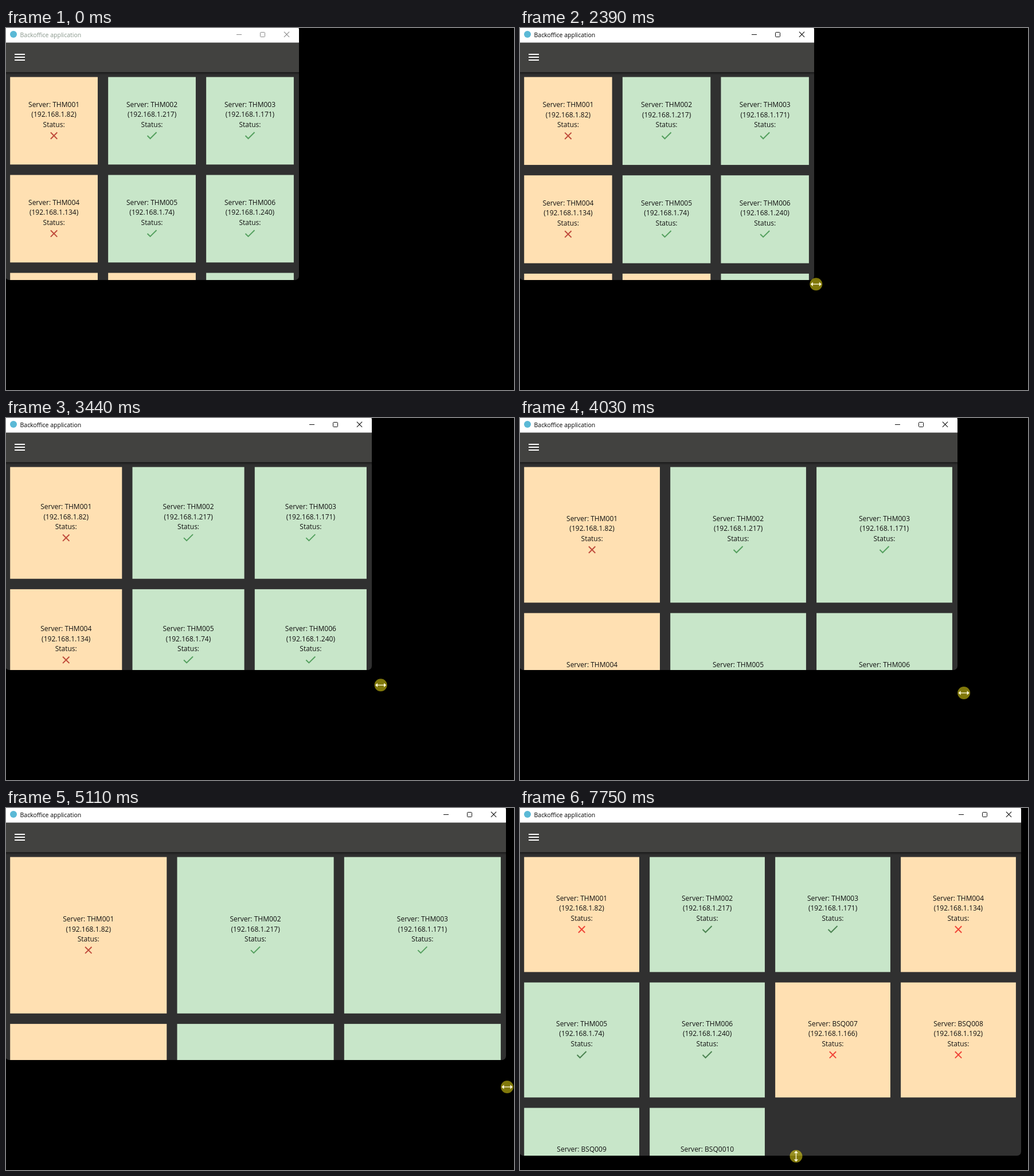
Write an HTML page with a canvas that moves like this. It is 886 px wide and 632 px high and loops after 8000 ms.

```html
<!DOCTYPE html>
<html lang="en">
<head>
<meta charset="utf-8">
<title>Backoffice application</title>
<style>
  html, body { margin: 0; width: 100%; height: 100%; overflow: hidden; background: #000; }
  canvas { display: block; }
</style>
</head>
<body>
<canvas id="stage" width="886" height="632"></canvas>
<script>
const ctx = document.getElementById('stage').getContext('2d');
const LOOP = 8000;
const RESIZE_LAG = 70;     // the window trails the pointer by one repaint
const TABLET_HEIGHT = 573; // taller windows get a fourth column

const hosts = [82, 217, 171, 134, 74, 240, 166, 192, 55, 61];
const offline = [1, 4, 7, 8];
const servers = hosts.map((host, i) => ({
  name: (i < 6 ? 'THM00' : 'BSQ00') + (i + 1),
  address: `(192.168.1.${host})`,
  online: !offline.includes(i + 1),
}));

// Pointer path: time, x, y
const path = [
  [260, 715, 610], [600, 570, 490], [900, 502, 433], [1050, 509, 437],
  [1510, 509, 437], [1560, 510.5, 446], [2260, 510.5, 446],
  [2810, 535, 451], [2880, 541.5, 451.5], [3030, 561, 455],
  [3900, 757, 479], [3960, 763, 479.5], [4030, 774, 480],
  [4710, 861, 486], [5110, 874, 487], [5310, 874, 487],
  [5450, 800, 478], [5700, 560, 447], [5940, 470, 435], [6270, 470, 435],
  [6330, 474.5, 442], [6810, 474.5, 441], [7150, 475.5, 499],
  [7220, 476, 536.5], [7550, 480, 598], [7680, 481.5, 608],
];

const clamp = v => Math.min(1, Math.max(0, v));

function pointerAt(t) {
  const next = path.findIndex(key => key[0] > t);
  if (next < 0) return path.at(-1).slice(1);
  if (next === 0) return path[0].slice(1);
  const [t0, x0, y0] = path[next - 1], [t1, x1, y1] = path[next];
  const k = (t - t0) / (t1 - t0);
  return [x0 + (x1 - x0) * k, y0 + (y1 - y0) * k];
}

function windowSize(t) {
  const [x, y] = pointerAt(t - RESIZE_LAG);
  const width = t < 2260 + RESIZE_LAG ? 511 : t < 5310 ? Math.max(511, x) : 874;
  const height = t < 6810 + RESIZE_LAG ? 440 : Math.max(440, y - 1);
  return [Math.round(width), Math.round(height)];
}

function rect(color, x, y, w, h) {
  ctx.fillStyle = color;
  ctx.fillRect(x, y, w, h);
}

function circle(color, x, y, r) {
  ctx.fillStyle = color;
  ctx.beginPath();
  ctx.arc(x, y, r, 0, 2 * Math.PI);
  ctx.fill();
}

function lines(color, width, ...strokes) {
  ctx.strokeStyle = color;
  ctx.lineWidth = width;
  ctx.beginPath();
  for (const [start, ...rest] of strokes) {
    ctx.moveTo(...start);
    rest.forEach(p => ctx.lineTo(...p));
  }
  ctx.stroke();
}

function polygon(color, points) {
  ctx.fillStyle = color;
  ctx.beginPath();
  points.forEach(p => ctx.lineTo(...p));
  ctx.fill();
}

function cross(color, width, x, y, r) {
  lines(color, width, [[x - r, y - r], [x + r, y + r]], [[x - r, y + r], [x + r, y - r]]);
}

function drawTitleBar(width, active) {
  rect('#fff', 0, 0, width, 25.5);
  circle('#5bb9d6', 13, 11, 6);
  ctx.font = '10.5px "Open Sans", "Noto Sans", sans-serif';
  ctx.textAlign = 'left';
  ctx.fillStyle = active ? '#000' : '#87968a';
  ctx.fillText('Backoffice application', 24.5, 15.5);
  const color = active ? '#111' : '#8a8a8a';
  lines(color, 1, [[width - 109, 11.5], [width - 100, 11.5]]);
  ctx.beginPath();
  ctx.roundRect(width - 67.5, 7.5, 8, 8, 1);
  ctx.stroke();
  cross(color, 1.1, width - 21.5, 11.3, 4.6);
}

function drawAppBar(width) {
  rect('#424240', 0, 25.5, width, 51.5);
  for (const y of [45, 50, 55]) rect('#fff', 15, y, 18, 2);
  const shadow = ctx.createLinearGradient(0, 77, 0, 82);
  shadow.addColorStop(0, 'rgba(0,0,0,.45)');
  shadow.addColorStop(1, 'rgba(0,0,0,0)');
  rect(shadow, 0, 77, width, 5);
}

function drawTile(server, x, y, size, tablet) {
  rect(server.online ? '#c8e6c9' : '#ffe0b2', x, y, size, size);
  const cx = x + size / 2, cy = y + size / 2;
  ctx.font = '12px "Open Sans", "Noto Sans", sans-serif';
  ctx.textAlign = 'center';
  ctx.fillStyle = '#111';
  ['Server: ' + server.name, server.address, 'Status:'].forEach((text, i) =>
    ctx.fillText(text, cx, cy - 24 + i * 17.4));
  const iy = cy + 26;
  if (server.online) {
    lines(tablet ? '#4c8452' : '#55a05f', 2, [[cx - 8, iy], [cx - 3, iy + 5], [cx + 8, iy - 6]]);
  } else {
    cross(tablet ? '#f04538' : '#c04c3c', 2, cx, iy, 5.7);
  }
}

function drawGrid(width, height) {
  const gap = 18.2, left = 7.2, top = 85.6, right = 9.1;
  const tablet = height >= TABLET_HEIGHT;
  const columns = tablet ? 4 : 3;
  const size = (width - left - right - gap * (columns - 1)) / columns;
  servers.forEach((server, i) => {
    const column = i % columns, row = Math.floor(i / columns);
    drawTile(server, left + column * (size + gap), top + row * (size + gap), size, tablet);
  });
}

function drawScrollbar(t) {
  const alpha = clamp((t - 1060) / 130) * clamp((1850 - t) / 300);
  if (!alpha) return;
  ctx.globalAlpha = alpha;
  ctx.fillStyle = '#666';
  ctx.beginPath();
  ctx.roundRect(501.5, 77.5, 7.5, 192, 3.5);
  ctx.fill();
  ctx.globalAlpha = 1;
}

function drawWindow(t) {
  const [width, height] = windowSize(t);
  ctx.save();
  ctx.beginPath();
  ctx.roundRect(-1, -4, width + 1, height + 4, 7);
  ctx.clip();
  rect('#303030', 0, 0, width, height);
  drawGrid(width, height);
  drawAppBar(width);
  drawTitleBar(width, t >= 2260);
  drawScrollbar(t);
  ctx.restore();
}

function drawArrow() {
  polygon('#fff', [[0, 0], [0, 14.5], [3.3, 11.5], [5.8, 17], [8.2, 16], [5.8, 10.6], [10.5, 10.4]]);
}

function drawResizer(vertical, pressed) {
  if (pressed) circle('rgba(255,240,20,.5)', 0, 0, 11);
  if (vertical) ctx.rotate(Math.PI / 2);
  const color = pressed ? '#fffbdc' : '#fff';
  lines(color, 1.3, [[-7, 0], [7, 0]]);
  for (const side of [-1, 1]) {
    polygon(color, [[side * 9.5, 0], [side * 5.5, -3.7], [side * 5.5, 3.7]]);
  }
}

function drawPointer(t) {
  if (t < 260) return;
  ctx.save();
  ctx.translate(...pointerAt(t));
  const horizontal = t >= 1540 && t < 5310;
  const vertical = t >= 6300;
  if (horizontal || vertical) drawResizer(vertical, t >= (vertical ? 6810 : 2260));
  else drawArrow();
  ctx.restore();
}

function frame(now) {
  const t = now % LOOP;
  rect('#000', 0, 0, 886, 632);
  drawWindow(t);
  drawPointer(t);
  requestAnimationFrame(frame);
}
requestAnimationFrame(frame);
</script>
</body>
</html>
```
